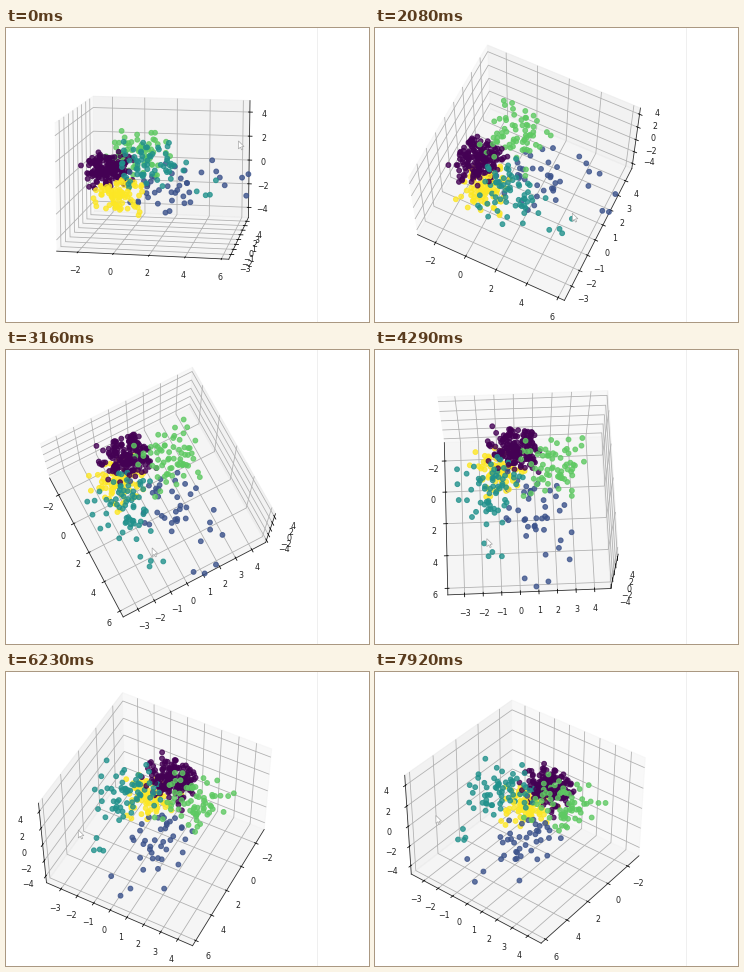
A matplotlib script that plays this animation: 363 by 294 pixels, repeating every 7990 ms.

```python
import numpy as np
import matplotlib.pyplot as plt
from matplotlib.animation import FuncAnimation
from matplotlib.patches import Polygon

W, H, DPI = 363, 294, 72
FRAMES, STEP = 94, 85
SIZE = 259                  # side of the square 3D axes in pixels
PX_PER_DEG = SIZE / 180     # mouse travel that turns the view by one degree
LAG = 250                   # ms by which the view trails the pointer
plt.rcParams["font.family"] = "DejaVu Sans"

# Key views of the drag: time (ms), elevation, azimuth
VIEWS = np.array([
    (0, 12, -80), (1120, 34.5, -83), (2080, 63, -63), (3160, 75.5, -27.5),
    (4290, 71, -1.5), (6230, 50, 28), (7920, 38, 38),
])
TIMES, ANGLES = VIEWS[:, 0], VIEWS[:, 1:]
SLOPES = np.gradient(ANGLES, TIMES, axis=0)

# label, count, centre, spread; the last two are sparse tails
CLUSTERS = [
    (0, 165, (-1.15, -0.05, 0.4), 0.62),
    (1, 32, (1.8, 0.9, -1.4), 0.8),
    (2, 62, (1.6, -1.4, 1.3), 0.88),
    (3, 66, (0.2, 1.8, 1.2), 0.85),
    (4, 85, (-0.4, -0.85, -1.3), 0.68),
    (1, 10, (4.4, 2.0, -1.4), 1.05),
    (2, 4, (5.1, -1.6, -0.2), 0.4),
]


def view_at(t):
    """Elevation and azimuth on a smooth cubic through the key views."""
    t = np.clip(t, TIMES[0], TIMES[-1])
    k = min(np.searchsorted(TIMES, t, side="right"), len(TIMES) - 1) - 1
    h = TIMES[k + 1] - TIMES[k]
    u = (t - TIMES[k]) / h
    ease = u * u * (3 - 2 * u)
    return (ANGLES[k] + ease * (ANGLES[k + 1] - ANGLES[k])
            + h * u * (1 - u) * ((1 - u) * SLOPES[k] - u * SLOPES[k + 1]))


def make_points(seed=12):
    rng = np.random.default_rng(seed)
    clouds = [centre + spread * rng.triangular(-2.4, 0, 2.4, (n, 3))
              for _, n, centre, spread in CLUSTERS]
    labels = np.repeat([c[0] for c in CLUSTERS], [c[1] for c in CLUSTERS])
    return np.vstack(clouds), labels


fig = plt.figure(figsize=(W / DPI, H / DPI), dpi=DPI, facecolor="white")

ax = fig.add_axes([18 / W, 16 / H, SIZE / W, SIZE / H], projection="3d")
points, labels = make_points()
ax.scatter(*points.T, c=labels, cmap="viridis", s=23, linewidths=1, alpha=0.8)
ax.set(xlim=(-3.2, 6.4), ylim=(-3.9, 4.86), zlim=(-4.87, 4.95))
ax.set_xticks(range(-2, 7, 2))
ax.set_yticks(range(-3, 5))
ax.set_zticks(range(-4, 5, 2))
ax.tick_params(labelsize=7.9, pad=2.8, labelcolor="#222222")
for axis in (ax.xaxis, ax.yaxis, ax.zaxis):
    axis.line.set_color("#2a2a2a")

# Pixel-space layer for the page edge and the mouse pointer
page = fig.add_axes([0, 0, 1, 1], zorder=5)
page.set(xlim=(0, W), ylim=(H, 0))
page.axis("off")
page.plot([311, 311], [0, H], color="#efefef", lw=1)
ARROW = np.array([(0, 0), (0, 8), (2, 6.3), (3.2, 9), (4.4, 8.4),
                  (3.2, 5.8), (5.6, 5.6)])
pointer = page.add_patch(Polygon(ARROW, closed=True, fc="white",
                                 ec="#a8a8a8", lw=0.7))


def update(i):
    t = i * STEP
    elev, azim = view_at(t)
    ax.view_init(elev=elev, azim=azim)
    lead_elev, lead_azim = view_at(t + LAG)
    pointer.set_xy(ARROW + (235 - PX_PER_DEG * (lead_azim + 83),
                            106 + PX_PER_DEG * (lead_elev - 12)))
    return ax, pointer


anim = FuncAnimation(fig, update, frames=FRAMES, interval=STEP,
                     init_func=lambda: update(0), repeat=True,
                     repeat_delay=0, blit=False)
plt.show()
```
